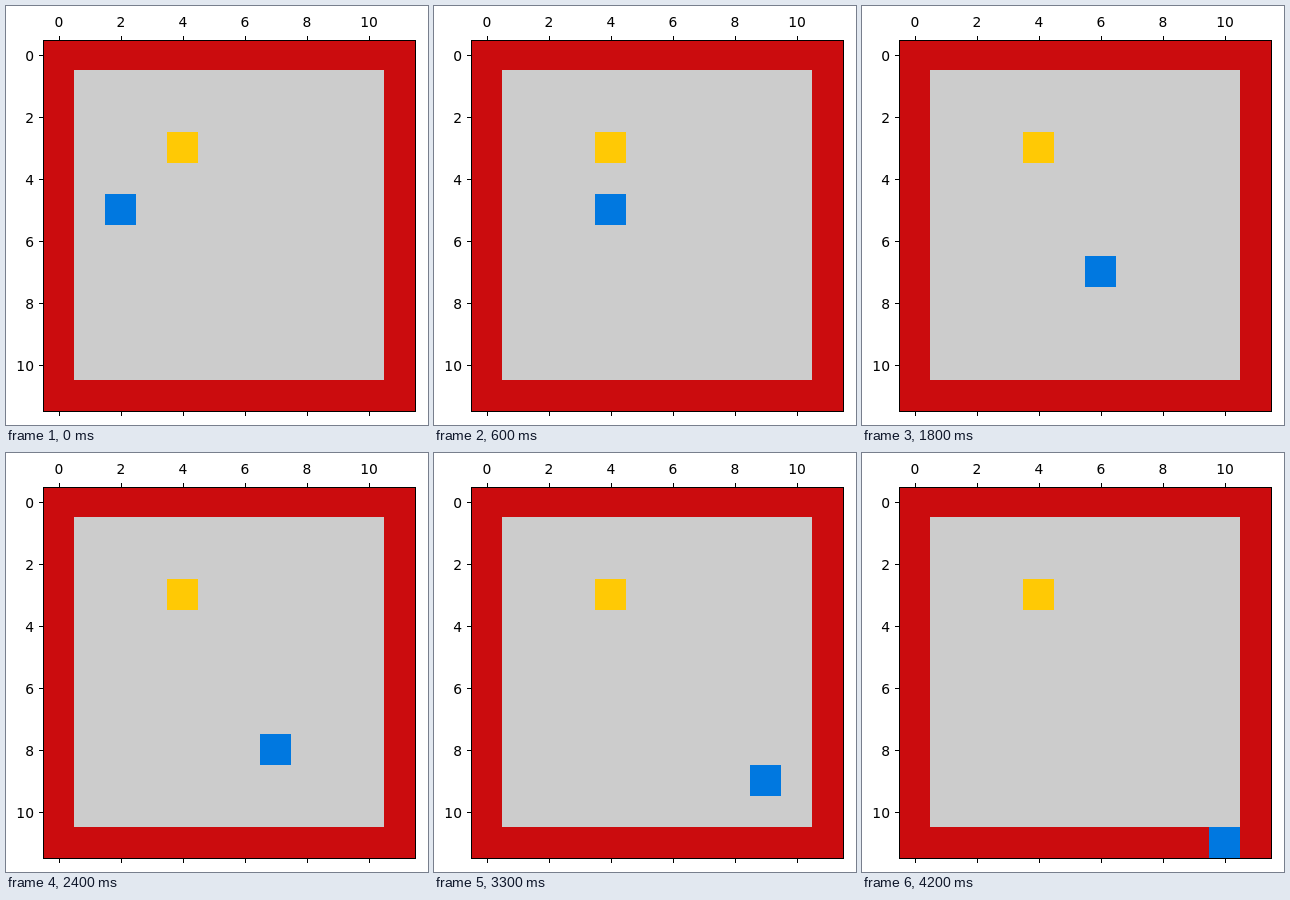
An HTML page with a canvas for the animation above (4500 ms loop, 422 px wide and 419 px high).

```html
<!DOCTYPE html>
<html lang="en">
<head>
<meta charset="utf-8">
<title>Grid walk</title>
<style>
  html, body { margin: 0; width: 100%; height: 100%; overflow: hidden; background: #fff; }
  canvas { display: block; }
</style>
</head>
<body>
<canvas id="stage" width="422" height="419"></canvas>
<script>
const ctx = document.getElementById('stage').getContext('2d');
const CELL = 31, LEFT = 37, TOP = 33, STEP_MS = 300, STEPS = 15;

function rect(color, x, y, w, h) {
  ctx.fillStyle = color;
  ctx.fillRect(x, y, w, h);
}

function cells(color, col, row, size = 1) {
  rect(color, LEFT + col * CELL, TOP + row * CELL, size * CELL, size * CELL);
}

function label(text, x, y, align) {
  ctx.textAlign = align;
  ctx.fillText(text, x, y);
}

function drawAxes() {
  ctx.strokeStyle = '#000';
  ctx.lineWidth = 1;
  ctx.strokeRect(37.5, 34.5, 372, 371);
  ctx.font = '13.89px "DejaVu Sans", sans-serif';
  for (let n = 0; n <= 10; n += 2) {
    const x = 53 + n * CELL, y = 49 + n * CELL;
    rect('#000', x, 30, 1, 4);
    rect('#000', x, 406, 1, 4);
    rect('#000', 33, y, 4, 1);
    label(n, x, 21, 'center');
    label(n, 28, y + 5.5, 'right');
  }
}

// Three steps right, then alternately down and right.
function walker(step) {
  return [
    2 + Math.min(step, 3) + Math.max(0, (step - 3) >> 1),
    5 + Math.max(0, (step - 2) >> 1)
  ];
}

function draw(now) {
  const step = Math.floor(now / STEP_MS) % STEPS;
  rect('#fff', 0, 0, 422, 419);
  rect('#cb0c0e', 37, 34, 372, 371);
  cells('#cccccc', 1, 1, 10);
  cells('#ffc905', 4, 3);
  cells('#0078e0', ...walker(step));
  drawAxes();
  requestAnimationFrame(draw);
}
requestAnimationFrame(draw);
</script>
</body>
</html>
```
